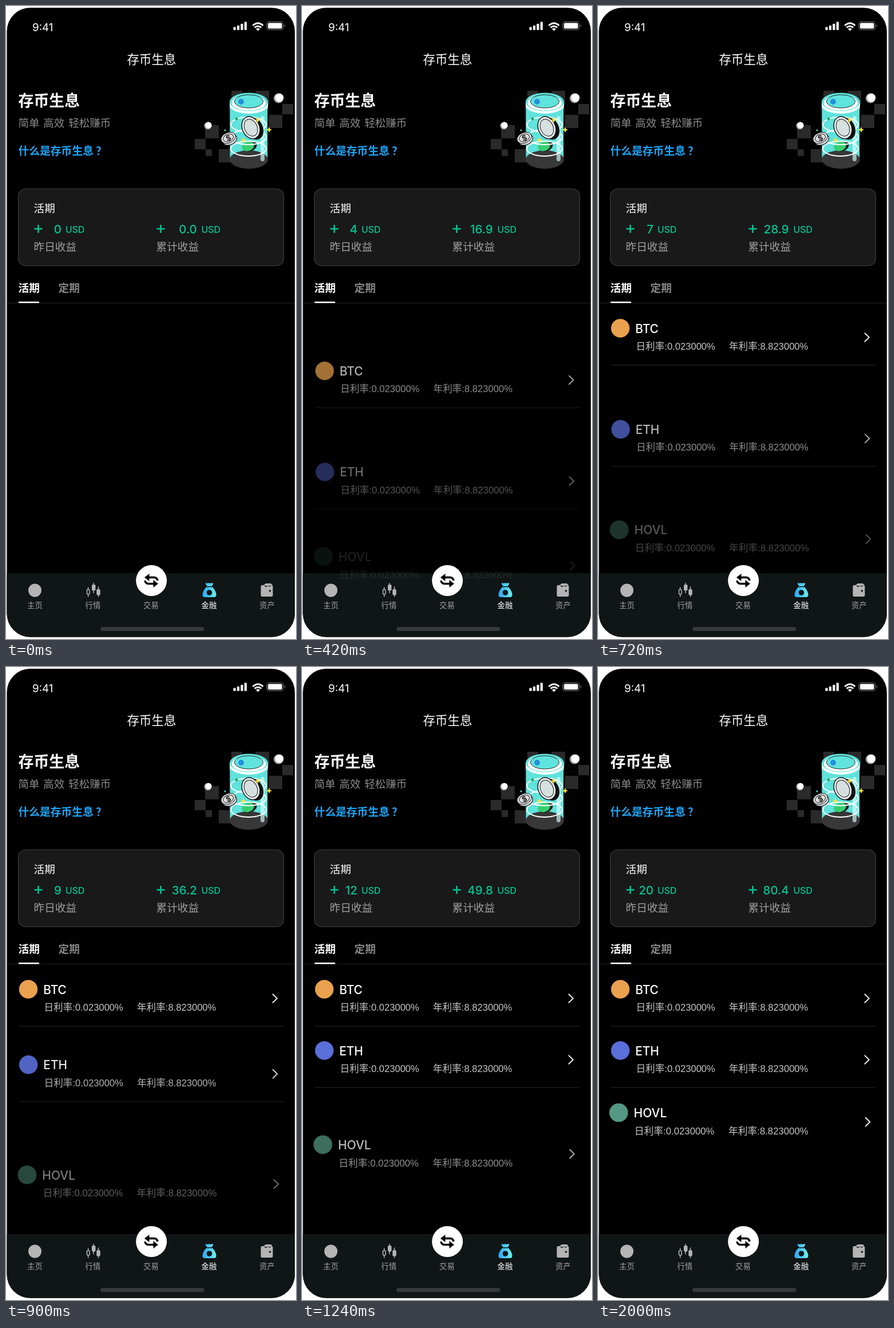
An HTML page for the animation above (3 s loop, 507x1105 px).

```html
<!DOCTYPE html>
<html lang="zh-CN">
<head>
<meta charset="utf-8">
<style>
html, body { margin: 0; width: 100%; height: 100%; overflow: hidden; background: #fff; }
svg { display: block; width: 100%; height: 100%; }
text { font-family: "Liberation Sans", "Noto Sans CJK SC", "Noto Sans CJK", sans-serif; fill: #fff; }
.num { font-family: Inter, sans-serif; }
.m { font-weight: 500; }
.b { font-weight: 600; }
.label { font-size: 18.7px; fill: #a0a0a0; }
.green { fill: #02c797; }
.rate { font-size: 16.6px; fill: #c8c8c8; }
.nav text { font-size: 13.4px; fill: #a3a3a3; text-anchor: middle; }
.line { fill: none; stroke-linecap: round; stroke-linejoin: round; }
</style>
</head>
<body>
<svg viewBox="0 0 507 1105">
  <defs>
    <linearGradient id="bag"><stop stop-color="#2aa5f5"/><stop offset="1" stop-color="#6ef0ea"/></linearGradient>
    <path id="spark" fill="#ffe03a" d="M0-5L1.5-1.5 5 0 1.5 1.5 0 5-1.5 1.5-5 0-1.5-1.5z"/>
    <path id="plus" d="M0 0h14M7-7v14" stroke="#02c797" stroke-width="2.5"/>
    <clipPath id="phone"><rect x="1.500" y="3" width="503.500" height="1098.500" rx="41"/></clipPath>
  </defs>
  <g clip-path="url(#phone)">
    <rect width="507" height="1105"/>
    <rect y="990" width="507" height="115" fill="#101516"/>
  </g>

  <!-- status bar -->
  <text class="num" x="46" y="44" font-size="18.8">9:41</text>
  <g fill="#fff">
    <rect x="397.500" y="36.500" width="4.200" height="5.500" rx="1.300"/>
    <rect x="403.900" y="34" width="4.200" height="8" rx="1.300"/>
    <rect x="410.300" y="31" width="4.200" height="11" rx="1.300"/>
    <rect x="416.700" y="27.500" width="4.200" height="14.500" rx="1.300"/>
    <rect x="458" y="29.500" width="24.500" height="10" rx="2.200"/>
    <path d="M487 32q2.500 2.500 0 5z" opacity=".5"/>
    <path d="M440.500 43.500l-3.500-3.600q3.500-3 7 0z"/>
  </g>
  <path class="line" style="stroke-linecap:butt" d="M431.500 34.300q9-8.400 18 0M434.600 37.700q5.900-5 11.800 0" stroke="#fff" stroke-width="2.900"/>
  <rect x="456" y="27.500" width="28.500" height="14" rx="4" fill="none" stroke="#777" stroke-width="1.200"/>

  <!-- heading -->
  <text class="m" x="254.500" y="101" font-size="21.5" text-anchor="middle">存币生息</text>
  <text class="b" x="21.500" y="175" font-size="26.9">存币生息</text>
  <text class="label" x="21.500" y="210.500" style="fill:#8b8b8b;font-size:18.5px;word-spacing:1.7px">简单 高效 轻松赚币</text>
  <text class="b" x="21.500" y="259.500" font-size="18.8" style="fill:#1ca6f9">什么是存币生息<tspan dx="4">？</tspan></text>

  <!-- illustration -->
  <path fill="#2a2a2a" d="M394 148h19v20h-19zM436 148h24v24h-24zM483 171h19v18h-19zM460 190h23v23h-23zM348 208h24v23h-24zM330 232h19v18h-19zM349 250h11v12h-11zM372 250h20v23h-20z"/>
  <circle cx="476.500" cy="161" r="8.500" fill="#aaa"/><circle cx="478" cy="160" r="7.300" fill="#fff"/>
  <circle cx="353" cy="209" r="6.500" fill="#aaa"/><circle cx="354" cy="208" r="5.500" fill="#fff"/>
  <path fill="#5fe3dc" d="M391 170h67v98h-67z"/>
  <ellipse cx="424.500" cy="268" rx="33.500" ry="16" fill="#383838"/>
  <path d="M391 180v88M457.500 180v88" stroke="#222" fill="none"/>
  <path fill="#fff" d="M391 168h67v5a33.500 15 0 0 1-67 0z"/>
  <ellipse cx="424.500" cy="167.500" rx="33.500" ry="16" fill="#5fe3dc"/>
  <ellipse cx="424.500" cy="169" rx="30" ry="13.500" fill="#fff"/>
  <ellipse cx="424.500" cy="166.500" rx="25" ry="11.500" fill="#5fe3dc" stroke="#222"/>
  <circle cx="411" cy="167" r="5" fill="#258fe0"/>
  <rect x="445" y="192" width="7" height="79" rx="3.500" fill="#d8fffb" opacity=".65"/>
  <ellipse cx="426" cy="245" rx="13" ry="9" fill="#222" transform="rotate(-20 426 245)"/>
  <ellipse cx="423" cy="245" rx="11" ry="8" fill="#36cf70" transform="rotate(-20 423 245)"/>
  <g class="line" stroke="#fff" stroke-width="2">
    <ellipse cx="424" cy="207" rx="31" ry="13"/>
    <ellipse cx="424" cy="229" rx="31" ry="13"/>
    <ellipse cx="424" cy="249" rx="31" ry="13"/>
  </g>
  <g transform="rotate(-24 429 212)">
    <ellipse cx="433" cy="216" rx="15" ry="20" fill="#111"/>
    <ellipse cx="428" cy="212" rx="15" ry="20" fill="#eef5f4" stroke="#111" stroke-width="1.500"/>
    <ellipse cx="428" cy="212" rx="11" ry="15.500" fill="#d5e0df" stroke="#111"/>
  </g>
  <g transform="rotate(-22 389 231)">
    <ellipse cx="390" cy="234" rx="13" ry="9" fill="#ddd" stroke="#111"/>
    <ellipse cx="389" cy="230" rx="13" ry="9" fill="#f4f4f4" stroke="#111"/>
    <ellipse cx="389" cy="230" rx="9.500" ry="6.300" fill="#ddd" stroke="#111"/>
    <text class="b" x="389" y="235" font-size="14" text-anchor="middle" style="fill:#111">$</text>
  </g>
  <use href="#spark" x="460" y="216"/><use href="#spark" x="415" y="234"/><use href="#spark" x="440" y="199"/>
  <circle cx="403" cy="197" r="2.500" fill="#2aa565"/><circle cx="383" cy="217" r="1.500" fill="#5fe3dc"/>

  <!-- earnings card -->
  <rect x="21.500" y="319" width="464" height="134.500" rx="13" fill="#191919" stroke="#3d3d3d" stroke-width="1.200"/>
  <text x="48.500" y="359.500" font-size="18.7">活期</text>
  <use href="#plus" x="49.500" y="389"/>
  <use href="#plus" x="263.500" y="389"/>
  <g font-size="20.500" text-anchor="end">
    <text class="num m green" id="day" x="97" y="397"></text>
    <text class="num m green" id="total" x="333.800" y="397"></text>
  </g>
  <text class="num m green" x="104" y="395.800" font-size="15.800">USD</text>
  <text class="num m green" x="341.500" y="395.800" font-size="15.800">USD</text>
  <text class="label" x="48.500" y="427">昨日收益</text>
  <text class="label" x="262.500" y="427">累计收益</text>

  <!-- tabs -->
  <text class="b" x="21.500" y="499" font-size="18.7">活期</text>
  <text class="label b" x="91.500" y="499" style="fill:#858585">定期</text>
  <rect x="2" y="518" width="503" height="1" fill="#222"/>
  <rect x="22" y="516" width="36" height="2.500" fill="#fff"/>

  <g id="rows"></g>

  <!-- bottom bar -->
  <g class="nav" fill="#b4b4b4">
    <circle cx="50.500" cy="1020" r="11.500"/>
    <path d="M143.700 1014.500v17M153 1007v18M161.500 1013.500v18" stroke="#b4b4b4" stroke-width="1.500"/>
    <rect x="141.500" y="1018.500" width="4.500" height="8.500" rx="2" fill="#101516" stroke="#b4b4b4" stroke-width="1.600"/>
    <rect x="150" y="1010" width="6.500" height="10.500" rx="2"/>
    <rect x="158.300" y="1018" width="6.500" height="10.500" rx="2"/>
    <circle cx="254.200" cy="1003" r="27" fill="#fff"/>
    <g id="arrow" fill="#000">
      <path d="M242 997.500l8.500-6.500v13z"/>
      <path d="M249 997.500h10q5 0 6 5.500" fill="none" stroke="#000" stroke-width="3.500"/>
    </g>
    <use href="#arrow" transform="rotate(180 254 1003)"/>
    <g fill="url(#bag)">
      <path d="M350 1007q3 1.500 5.500 0 2.500 1.500 5.500 0l1.500 1.500-3 4.500h-8l-3-4.500zM350 1014.500h11q6.500 7 6.500 13.500 0 4-4 4h-16q-4 0-4-4 0-6.500 6.500-13.500z"/>
      <circle cx="355.500" cy="1024" r="4.800" fill="#0c1517"/>
    </g>
    <path d="M449 1012l5-4h8q3 0 3.500 4z"/>
    <rect x="445.500" y="1011" width="21" height="20" rx="2.500"/>
    <path d="M452 1011.500q2.500 4 5 0M459 1011.500q2 3 4 0" fill="none" stroke="#101516" stroke-width="1.300"/>
    <circle cx="461.500" cy="1021" r="1.800" fill="#101516"/>
    <text x="50.500" y="1050.500">主页</text>
    <text x="152" y="1050.500">行情</text>
    <text x="253.500" y="1050.500">交易</text>
    <text x="355" y="1050.500" style="fill:#fff">金融</text>
    <text x="456.500" y="1050.500">资产</text>
  </g>
  <rect x="165" y="1084" width="181.500" height="7" rx="3.500" fill="#363a3b"/>
</svg>
<script>
const $ = id => document.getElementById(id);

// y: resting place, end: arrival time, fade: when the fade begins
const rows = [
  { name: 'BTC', color: '#e9a14e', y: 562.5, end: 600, fade: 0, scale: 1, line: true },
  { name: 'ETH', color: '#5a6fda', y: 669.5, end: 1000, fade: 0, scale: 1, line: true },
  { name: 'HOVL', color: '#549782', y: 778, end: 1600, fade: 260, scale: 1.01 }
];

$('rows').innerHTML = rows.map(r => `<g>
  <circle cx="39" r="16.2" fill="${r.color}"/>
  <text class="num m" x="65.200" y="8" font-size="20.800">${r.name}</text>
  <text class="rate" x="66.500" y="37.500">日利率:0.023000%</text>
  <text class="rate" x="229" y="37.500">年利率:8.823000%</text>
  <path class="line" d="M466.500 8.700l7.500 7.300-7.500 7.300" stroke="#e8e8e8" stroke-width="2"/>
  ${r.line ? '<rect x="22" y="64" width="463" height="1" fill="#292929"/>' : ''}
</g>`).join('');
const groups = [...$('rows').children];

const clamp = v => Math.min(1, Math.max(0, v));

function draw(t) {
  rows.forEach((r, i) => {
    const left = 1 - clamp(t / r.end);
    const x = 330 * (1 - r.scale) + 1.8 * left;
    groups[i].setAttribute('transform', `translate(${x} ${r.y + 248 * left}) scale(${r.scale})`);
    groups[i].setAttribute('opacity', clamp((t - r.fade) / (r.end - r.fade)));
  });
  const p = clamp(t / 2000);
  $('day').textContent = Math.round(20 * p);
  $('total').textContent = (80.4 * p).toFixed(1);
}

const step = 20;
const start = performance.now();
function tick() {
  const t = (performance.now() - start) % 3000;
  draw(Math.floor(t / step) * step);
  requestAnimationFrame(tick);
}
tick();
</script>
</body>
</html>
```
